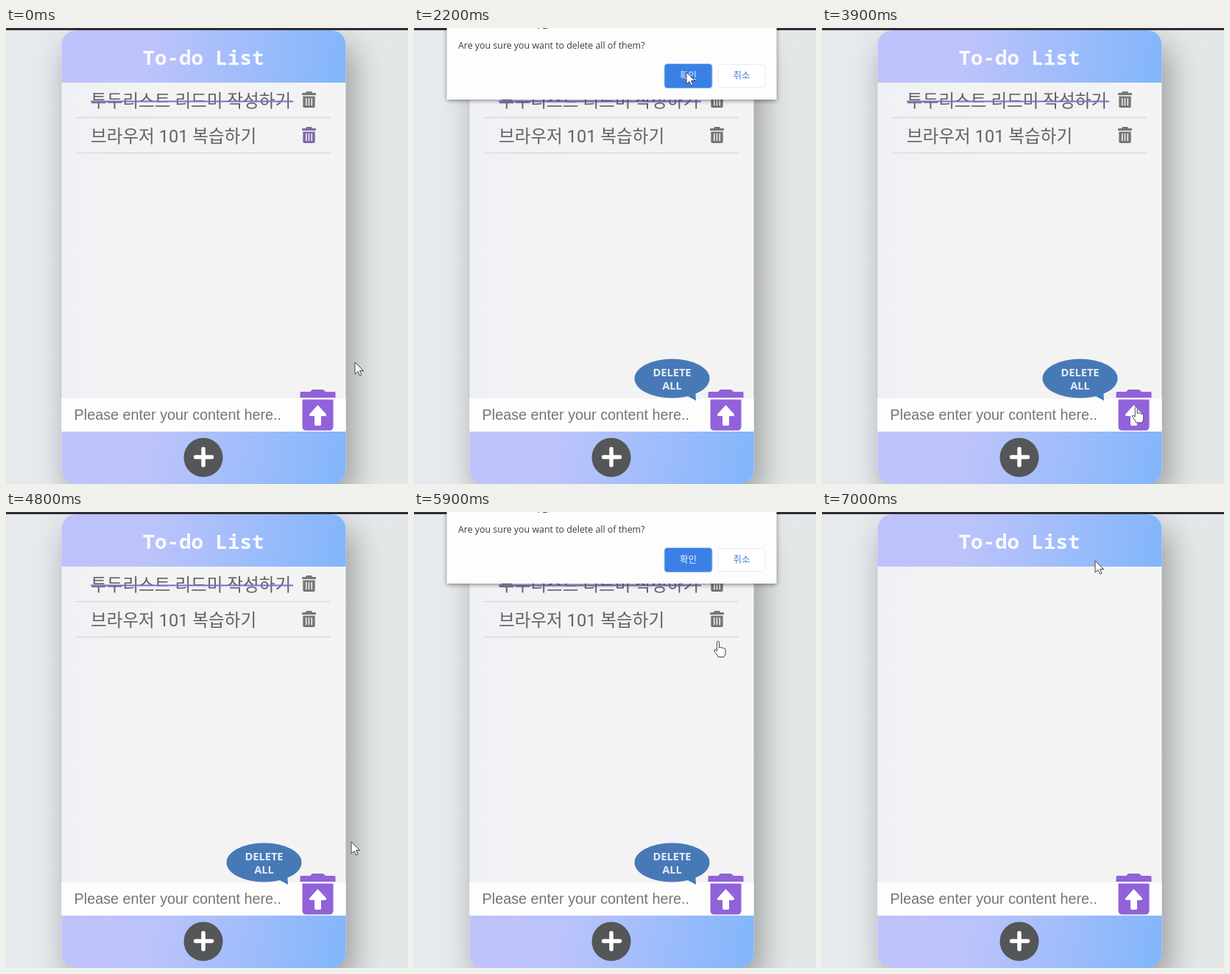
An HTML page for the animation above (7100 ms loop, 546x618 px).

```html
<!DOCTYPE html>
<html lang="ko">
<head>
<meta charset="utf-8">
<style>
  html, body { margin: 0; width: 100%; height: 100%; overflow: hidden; background: #e6eaec; }
  svg { display: block; width: 546px; height: 618px; }
  text { white-space: pre; }
  .title { font: bold 27.5px "Noto Sans Mono", monospace; fill: #fafaff; }
  .item { font: 23.6px Roboto, "Noto Sans CJK KR", sans-serif; fill: #626264; }
  .field { font: 19.8px "Liberation Sans", Arial, sans-serif; fill: #757575; }
  .tip { font: bold 14.6px "Open Sans", sans-serif; fill: #e4ecf7; text-anchor: middle; }
  .ask { font: 12.4px "Open Sans", "Noto Sans CJK KR", sans-serif; fill: #3a3c40; }
  .host { font-size: 14px; fill: #26282c; }
  .button { font: 12.5px "Noto Sans CJK KR", sans-serif; text-anchor: middle; }
</style>
</head>
<body>
<svg viewBox="0 0 546 618">
  <defs>
    <linearGradient id="bar" gradientUnits="userSpaceOnUse" x1="75" y1="0" x2="452" y2="70">
      <stop offset="0" stop-color="#bfc2fb"/>
      <stop offset=".33" stop-color="#bcc3fb"/>
      <stop offset="1" stop-color="#83b6fb"/>
    </linearGradient>
    <linearGradient id="foot" href="#bar" gradientTransform="translate(0 545)"/>
    <linearGradient id="page">
      <stop offset="0" stop-color="#e6eaed"/>
      <stop offset="1" stop-color="#e4e7e7"/>
    </linearGradient>
    <linearGradient id="sheet">
      <stop offset="0" stop-color="#f0f1f5"/>
      <stop offset=".4" stop-color="#f3f3f3"/>
    </linearGradient>
    <filter id="blur" x="-50%" y="-50%" width="200%" height="200%"><feGaussianBlur stdDeviation="22"/></filter>
    <filter id="soft" x="-10%" y="-30%" width="120%" height="160%"><feGaussianBlur stdDeviation="3"/></filter>
    <clipPath id="card"><rect x="75.5" y="3" width="386" height="615" rx="20"/></clipPath>
    <path id="can" fill-rule="evenodd" d="M1 2h4l1-2h7l1 2h4q1 0 1 1v2H0V3q0-1 1-1zM1.3 6.5h16.4V20q0 2-2 2H3.3q-2 0-2-2zM5 9v10h1.5V9zm3.7 0v10h1.5V9zm3.8 0v10H14V9z"/>
  </defs>

  <rect width="546" height="618" fill="url(#page)"/>
  <rect x="85" y="23" width="386" height="615" rx="20" opacity=".34" filter="url(#blur)"/>
  <rect width="546" height="3" fill="#2d2d34"/>

  <g clip-path="url(#card)">
    <rect x="75" y="3" width="387" height="615" fill="url(#sheet)"/>
    <rect x="75" y="3" width="387" height="71" fill="url(#bar)"/>
    <rect x="75" y="502" width="387" height="45" fill="#fdfdfd"/>
    <rect x="75" y="547" width="387" height="71" fill="url(#foot)"/>
  </g>
  <text class="title" x="185.5" y="49.5">To-do List</text>

  <g id="list">
    <path d="M95 121.5H441M95 169.5H441" stroke="#d9d9db" stroke-width="1.3"/>
    <text class="item" x="115" y="106.5">투두리스트 리드미 작성하기</text>
    <path d="M115 99.5H390" stroke="#8d66cf" stroke-width="2"/>
    <text class="item" x="115" y="154.5">브라우저 101 복습하기</text>
    <use href="#can" x="402" y="86" fill="#77777a"/>
    <use id="second" href="#can" x="402" y="134"/>
  </g>

  <text class="field" x="92.6" y="531">Please enter your content here..</text>
  <g id="bubble" fill="#4779b7">
    <path d="M370 498L383 505L382 490Z"/>
    <ellipse cx="350.5" cy="475" rx="51" ry="26.5"/>
    <text class="tip" x="350.5" y="472">DELETE</text>
    <text class="tip" x="350.5" y="490">ALL</text>
  </g>

  <g fill="#9262da">
    <path d="M401 493h12l2-2q1-1 2-1h13q1 0 2 1l2 2h12q1.5 0 1.5 1.5V501H399.5v-6.5Q399.5 493 401 493z"/>
    <path d="M402.5 503.5h42V540q0 5.500-5.500 5.500h-31q-5.500 0-5.500-5.500z"/>
  </g>
  <path d="M423.5 511L435 523.5Q435.5 526 433 526H428V537q0 2-2 2h-5q-2 0-2-2V526H414Q411.5 526 412 523.5z" fill="#fff"/>
  <circle cx="268" cy="582" r="26.5" fill="#555657"/>
  <path d="M257.5 581.5H279.5M268 570.5V592.5" stroke="#fff" stroke-width="5.5" stroke-linecap="round"/>

  <g id="dialog">
    <rect x="45" y="-10" width="447" height="108" opacity=".5" filter="url(#soft)"/>
    <rect x="44.5" y="-5" width="448" height="102" fill="#fdfdfe"/>
    <text class="ask host" x="60" y="-1">127.0.0.1:5500 내용:</text>
    <text class="ask" x="60" y="28">Are you sure you want to delete all of them?</text>
    <rect x="340" y="48.5" width="65" height="33" rx="4" fill="#3a80e6" stroke="#a9c8f5"/>
    <rect x="413.5" y="49.5" width="63" height="31" rx="4" fill="#fff" stroke="#e8ebef"/>
    <text class="button" x="372.5" y="69" fill="#eef5ff">확인</text>
    <text class="button" x="445" y="69" fill="#3f7fd9">취소</text>
  </g>

  <g id="cursor" fill="#fff" stroke="#444" stroke-linejoin="round">
    <path id="arrow" d="M0 0V16L4 12.5L6.5 18L9 17L6.5 11.5H11.5Z"/>
    <path id="hand" d="M-2.500 1Q-1 -1 .5 1V9Q2 7 3.500 9Q5 8 6.500 10Q8.500 9 9 11.500V16Q9 19 7 21.500H-1Q-2 18 -6 14Q-7 11.500 -5 11.500L-2.500 13.500Z"/>
  </g>
</svg>
<script>
const LOOP = 7100, STEP = 100;
const el = id => document.getElementById(id);
const show = (id, on) => el(id).setAttribute('opacity', +on);
const between = (t, a, b) => t >= a && t < b;

// Pointer stops: time, x, y
const stops = [
  [0, 474, 453], [300, 432, 510], [700, 426, 514], [900, 416, 409],
  [1300, 374, 62], [2200, 370, 60], [2450, 445, 64], [2800, 446, 66],
  [3100, 439, 318], [3400, 431, 512], [4500, 426, 514], [4800, 469, 447],
  [5100, 430, 512], [5500, 426, 514], [5900, 414, 175], [6200, 372, 66],
  [LOOP, 371, 66]
];

const slope = (i, k) => (stops[i + 1][k] - stops[i][k]) / (stops[i + 1][0] - stops[i][0]);

// Speed at a stop: flowing through on a steady course, zero at a turn
function speed(i, k) {
  if (i === 0 || i === stops.length - 1) return 0;
  const a = slope(i - 1, k), b = slope(i, k);
  return a * b > 0 ? 2 * a * b / (a + b) : 0;
}

function pointer(t) {
  const i = stops.findIndex(s => s[0] > t) - 1;
  const span = stops[i + 1][0] - stops[i][0];
  const p = (t - stops[i][0]) / span, q = 1 - p;
  return [1, 2].map(k =>
    stops[i][k] * q * q * (1 + 2 * p) + stops[i + 1][k] * p * p * (3 - 2 * p) +
    span * p * q * (speed(i, k) * q - speed(i + 1, k) * p));
}

function draw() {
  const t = Math.floor(performance.now() % LOOP / STEP) * STEP;
  const [x, y] = pointer(t);
  const open = between(t, 800, 2700) || between(t, 5600, 6500);
  const onCan = between(x, 399, 448) && between(y, 489, 546);
  const hand = onCan || (open && y > 97);

  show('dialog', open);
  show('bubble', between(t, 300, 2700) || between(t, 3400, 6500));
  show('list', t < 6500);
  show('arrow', !hand);
  show('hand', hand);
  el('second').setAttribute('fill', t < 200 ? '#826bab' : '#77777a');
  el('cursor').setAttribute('transform', `translate(${x} ${y})`);
  requestAnimationFrame(draw);
}
draw();
</script>
</body>
</html>
```
